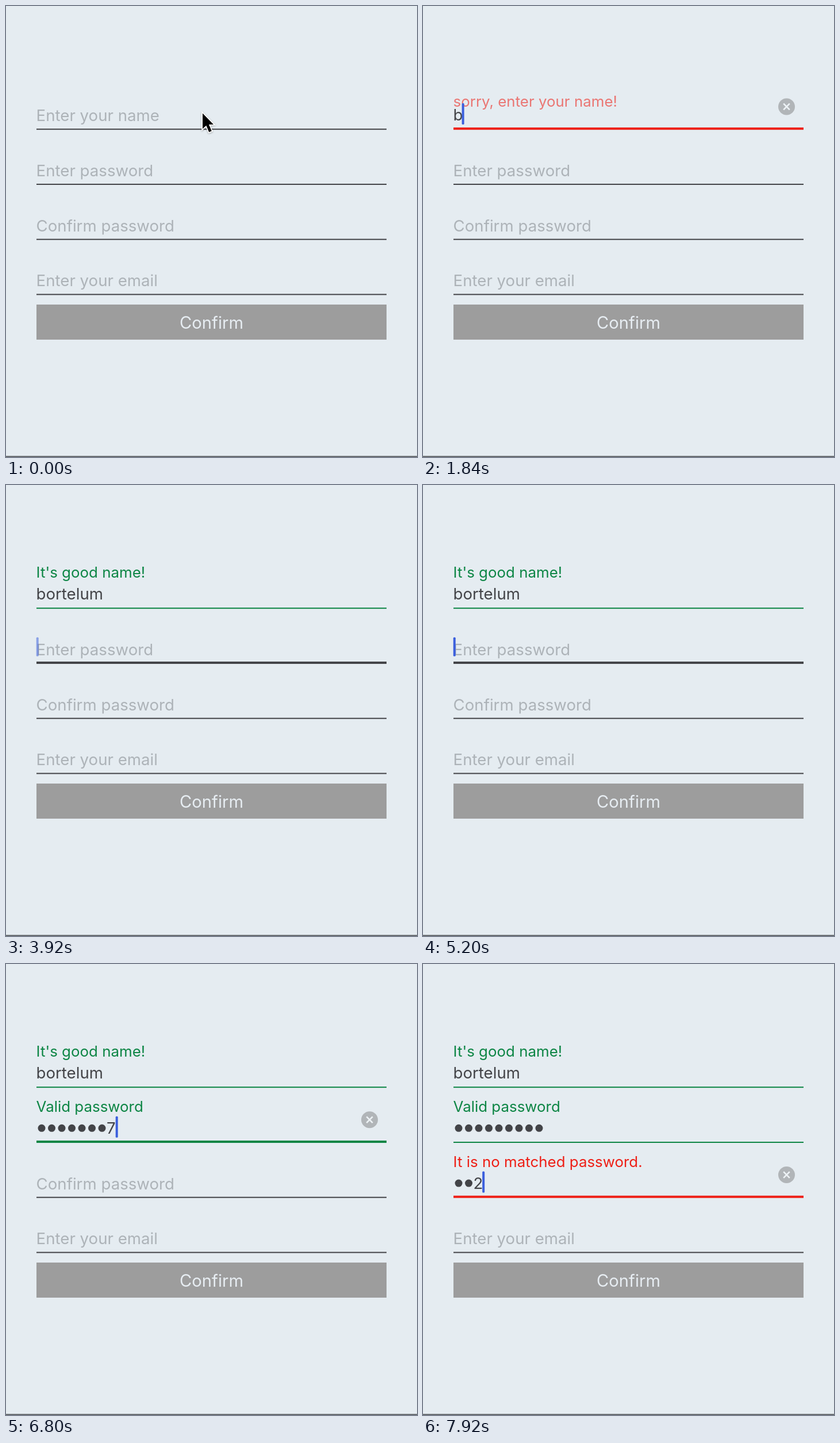
Animation, 715 px wide and 784 px high, one loop 8 s. Source, as an HTML page with a canvas:

```html
<!DOCTYPE html>
<html lang="en">
<head>
<meta charset="utf-8">
<title>Sign-up form</title>
<style>
html, body { margin: 0; width: 100%; height: 100%; overflow: hidden; background: #e5ecf1; }
canvas { display: block; }
</style>
</head>
<body>
<canvas id="stage" width="715" height="784"></canvas>
<script>
const ctx = document.getElementById('stage').getContext('2d');
const LOOP = 8000, LEFT = 53, RIGHT = 662, PITCH = 95.75;
const DARK = '#434448', RED = '#ee1f16', GREEN = '#0c8544', FAINT = '#adb3b8';
const DOT = 17.5; // advance of a masked character
const BODY = 27.65, NOTE = 25.9, BUTTON = 29.2; // type sizes

// keys: when each character arrives; note: when the message starts to rise
const fields = [
  { hint: 'Enter your name', bad: 'sorry, enter your name!', good: "It's good name!", need: 6,
    text: 'bortelum', focus: [240, 3280], note: 1680,
    keys: [1680, 1920, 2080, 2240, 2400, 2560, 2800, 2960] },
  { hint: 'Enter password', bad: 'Invalid password', good: 'Valid password', need: 8, masked: true,
    text: '012345678', focus: [3280, 7200], note: 5220,
    keys: [5280, 5520, 5760, 5880, 6000, 6160, 6400, 6640, 6880] },
  { hint: 'Confirm password', bad: 'It is no matched password.', need: 99, masked: true,
    text: '012', focus: [7200, LOOP], note: 7440, keys: [7440, 7760, 7920] },
  { hint: 'Enter your email', focus: [LOOP, LOOP], keys: [] }
];
const blinks = [[820, 1640], [3800, 5280]];

const clamp = v => Math.max(0, Math.min(1, v));

function label(text, x, y, size, color) {
  ctx.font = size + 'px Inter, Roboto, sans-serif';
  ctx.fillStyle = color;
  ctx.fillText(text, x, y);
  return ctx.measureText(text).width;
}

function disc(x, y, r, color) {
  ctx.fillStyle = color;
  ctx.beginPath();
  ctx.arc(x, y, r, 0, 7);
  ctx.fill();
}

function caretAlpha(t) {
  const span = blinks.find(b => t >= b[0] && t < b[1]);
  if (!span) return 1;
  const phase = (t - span[0]) % 800;
  return phase < 400 ? clamp(1 - phase / 260) : clamp((phase - 400) / 200);
}

function drawClear(y) {
  disc(632.5, y, 14.5, '#b1b5b8');
  ctx.strokeStyle = '#eef3f6';
  ctx.lineWidth = 2.6;
  ctx.beginPath();
  for (const s of [-1, 1]) {
    ctx.moveTo(627.2, y - 5.3 * s);
    ctx.lineTo(637.8, y + 5.3 * s);
  }
  ctx.stroke();
}

function drawValue(f, count, active, y) {
  if (!f.masked) return label(f.text.slice(0, count), 52.5, y + 199, BODY, DARK);
  const dots = active ? count - 1 : count;
  for (let i = 0; i < dots; i++) disc(62 + DOT * i, y + 189.6, 6.5, DARK);
  if (active) label(f.text[count - 1], 52.5 + DOT * dots, y + 199, BODY, DARK);
  return DOT * count;
}

function drawField(f, row, t) {
  const y = row * PITCH;
  const count = f.keys.filter(k => k <= t).length;
  const active = t >= f.focus[0] && t < f.focus[1];
  const valid = count >= f.need;
  const color = !count ? DARK : valid ? GREEN : RED;
  let width = 2;

  ctx.fillStyle = color;
  const weight = active ? 4 : 2;
  ctx.fillRect(LEFT, y + 215.2 - weight, RIGHT - LEFT, weight);

  if (count) {
    const p = clamp((t - f.note) / 280);
    ctx.globalAlpha = p;
    label(valid ? f.good : f.bad, 52.6, y + 161 + 32 * (1 - p), NOTE, color);
    ctx.globalAlpha = 1;
    width = drawValue(f, count, active, y);
    if (active) drawClear(y + 175);
  } else {
    label(f.hint, 52.6, y + 200, BODY, FAINT);
  }

  if (active) {
    ctx.globalAlpha = caretAlpha(t);
    ctx.fillStyle = '#3b5fdd';
    ctx.beginPath();
    ctx.roundRect(50.7 + width, y + 169, 4, count || !row ? 37 : 33, 1.5);
    ctx.fill();
    ctx.globalAlpha = 1;
  }
}

function drawPointer(t) {
  if (t >= 1040) return;
  const drop = 36 * clamp((t - 200) / 280) + 2.4 * Math.max(0, t - 840);
  ctx.save();
  ctx.translate(342, 186.5 + drop);
  const arrow = new Path2D('M0 0V27L6.3 21.2L11.2 32.8L15.8 30.8L10.9 19.4H19Z');
  ctx.shadowColor = 'rgba(0,0,0,.3)';
  ctx.shadowBlur = 3;
  ctx.shadowOffsetY = 1;
  ctx.strokeStyle = '#fff';
  ctx.lineWidth = 3.4;
  ctx.stroke(arrow);
  ctx.shadowColor = 'transparent';
  ctx.fillStyle = '#000';
  ctx.fill(arrow);
  ctx.restore();
}

function draw(now) {
  const t = now % LOOP;
  ctx.fillStyle = '#e5ecf1';
  ctx.fillRect(0, 0, 715, 784);
  ctx.fillStyle = '#6c7074';
  ctx.fillRect(0, 782, 715, 2);

  fields.forEach((f, row) => drawField(f, row, t));

  ctx.fillStyle = '#9d9d9d';
  ctx.fillRect(LEFT, 519, RIGHT - LEFT, 61);
  ctx.textAlign = 'center';
  label('Confirm', 357.5, 560.5, BUTTON, '#e7edf2');
  ctx.textAlign = 'left';

  drawPointer(t);
  requestAnimationFrame(draw);
}
requestAnimationFrame(draw);
</script>
</body>
</html>
```
